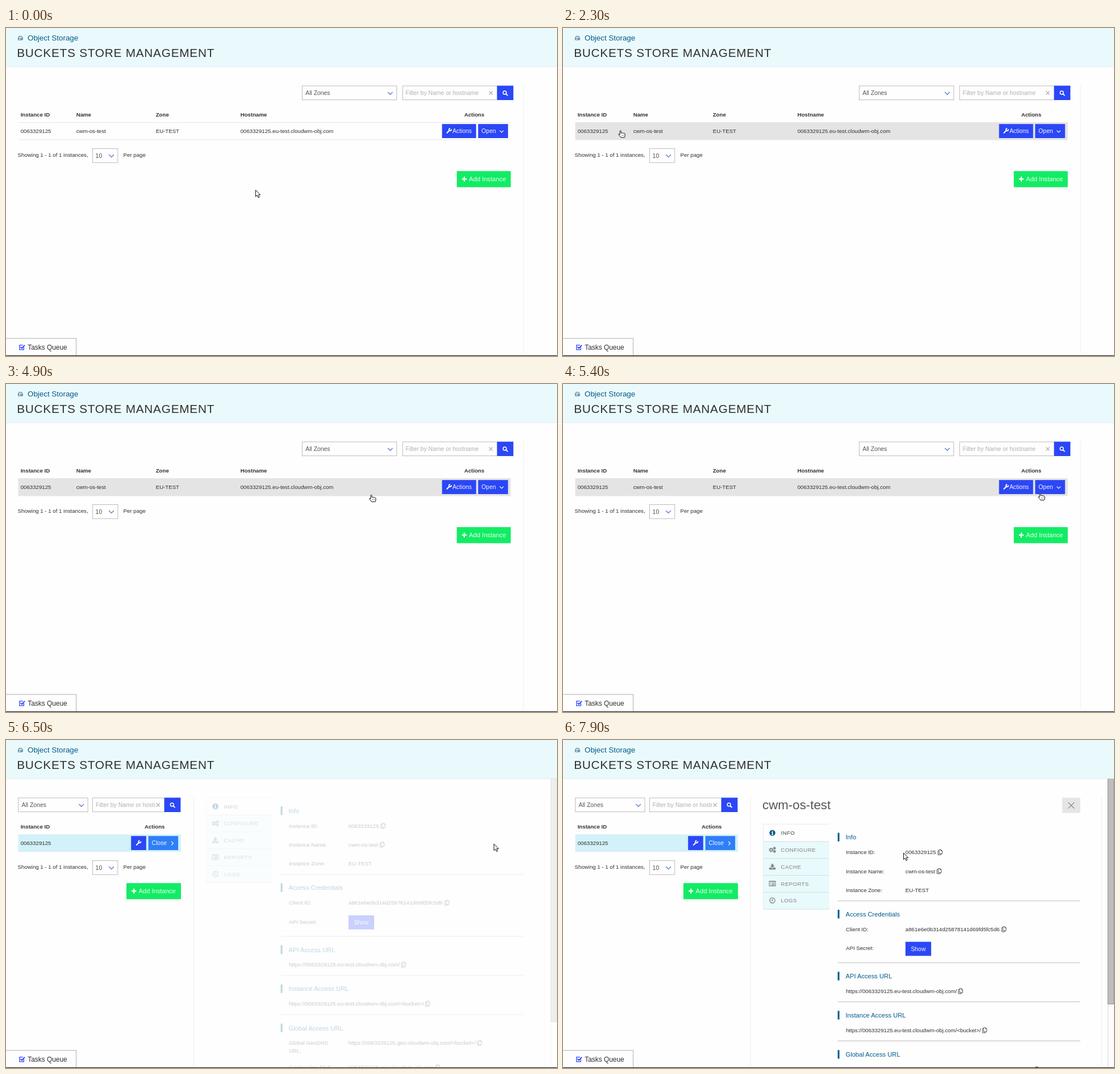
Write an HTML page that moves like this. It is 970x578 px and loops after 8000 ms.

```html
<!DOCTYPE html>
<html lang="en">
<head>
<meta charset="utf-8">
<title>Buckets store management</title>
<style>
html, body { margin: 0; width: 100%; height: 100%; overflow: hidden; background: #fefefe; }
svg { display: block; width: 970px; height: 578px; }
text { font-family: "Liberation Sans", Arial, sans-serif; white-space: pre; }
</style>
</head>
<body>
<svg id="stage" viewBox="0 0 970 578" width="970" height="578"></svg>
<script>
const LOOP = 8000, STEP = 100;
const INK = '#303030', BLUE = '#2b47f6', TEAL = '#005a8c', GREY = '#858585';
const HOST = '0063329125.eu-test.cloudwm-obj.com', ID = '0063329125';
const S = 9.67, M = 10.42, L = 11.16;

const text = (x, y, str, size = S, fill = INK, extra = '') =>
  `<text x="${x}" y="${y}" font-size="${size}" fill="${fill}" ${extra}>${str.replace(/</g, '&lt;')}</text>`;
const rect = (x, y, w, h, fill, extra = '') =>
  `<rect x="${x}" y="${y}" width="${w}" height="${h}" fill="${fill}" ${extra}/>`;
const line = (d, stroke, w = 1, extra = '') =>
  `<path d="${d}" fill="none" stroke="${stroke}" stroke-width="${w}" ${extra}/>`;
const shape = (d, fill, extra = '') => `<path d="${d}" fill="${fill}" ${extra}/>`;
const at = (x, y, body) => `<g transform="translate(${x} ${y})">${body}</g>`;
const bold = 'font-weight="bold"';

const box = (x, y, w, h) => rect(x, y, w, h, '#fefefe', 'stroke="#b4b4b4" stroke-width=".9"');
const chevron = (x, y, r, stroke, w = 1.1) => line(`M${x - r} ${y - r / 2}l${r} ${r}l${r} ${-r}`, stroke, w);
const wrench = (x, y) => at(x, y,
  line('M1.2 8.2L5.4 4', '#fff', 2.1, 'stroke-linecap="round"') +
  line('M8.6 1.7A2 2 0 1 1 6.7 .4', '#fff', 1.9));
const lens = (x, y) => at(x, y,
  '<circle cx="-.8" cy="-.8" r="2.9" fill="none" stroke="#fff" stroke-width="1.5"/>' +
  line('M1.4 1.4L4 4', '#fff', 1.9, 'stroke-linecap="round"'));
const cross = (x, y, r, stroke, w) => line(`M${x - r} ${y - r}l${2 * r} ${2 * r}M${x + r} ${y - r}l${-2 * r} ${2 * r}`, stroke, w);
const copy = (x, y) => at(x, y,
  line('M2.7 .5H6L8.2 2.6V7.7H2.7ZM2.7 2.2H.6V9.6H6V7.7M6 .5V2.6H8.2', '#3a3a3a', .85));

function header() {
  return rect(0, 0, 970, 68, '#eafafc') + rect(0, 67.6, 970, .9, '#e0e9eb') +
    line('M21.6 18L23 14.6H27.8L29.2 18V20.9H21.6ZM21.6 18H29.2M26 19.5H28', '#2f6080', .95) +
    text(38, 21.7, 'Object Storage', 13.38, TEAL) +
    text(19.2, 50.8, 'BUCKETS STORE MANAGEMENT', 20.8, INK, 'letter-spacing=".744"');
}

function filters(zx, zw, fx, fw) {
  const bx = fx + fw, clip = 'clip' + fx;
  return box(zx, 102, zw, 24.6) + text(zx + 5.8, 118.2, 'All Zones', M, '#555') +
    chevron(zx + zw - 11.4, 115, 4.3, '#3d63cc') +
    box(fx, 102, fw, 24.6) +
    `<clipPath id="${clip}">${rect(fx, 100, fw - 16.5, 28, '#000')}</clipPath>` +
    text(fx + 5.4, 118, 'Filter by Name or hostname', M, '#b0b0b0', `clip-path="url(#${clip})"`) +
    cross(bx - 11.3, 114.5, 3.1, '#a8a8a8', 1.3) +
    rect(bx - .3, 101.6, 28.7, 25.4, BLUE) + lens(bx + 14, 114.7);
}

function pager(ax, aw) {
  return text(20.6, 227.2, 'Showing 1 - 1 of 1 instances,') +
    box(152.4, 212.4, 44.4, 24.8) + text(157.6, 228.7, '10', M, '#555') +
    chevron(185.5, 225.4, 4.3, '#3d63cc') + text(206.6, 227.2, 'Per page') +
    rect(ax, 252.2, aw, 28.3, '#12ec64') +
    line(`M${ax + 9} 266.2h8.4M${ax + 13.2} 262v8.4`, '#fff', 2.3) +
    text(ax + 21.5, 270.2, 'Add Instance', L, '#e8ffee');
}

function wideList() {
  const head = [[26, 'Instance ID'], [124, 'Name'], [264, 'Zone'], [413, 'Hostname'], [807, 'Actions']];
  const cells = [[26, ID], [124, 'cwm-os-test'], [264, 'EU-TEST'], [413, HOST]];
  return filters(521.4, 166.4, 698.2, 166.6) + rect(910.6, 101, .9, 472, '#ececec') +
    head.map(([x, s]) => text(x - .3, 156, s, S, INK, bold)).join('') +
    rect(21.5, 166, 867, .9, '#e4e4e4') + rect(21.5, 196.5, 867, .9, '#e4e4e4') +
    '<rect id="row" x="21.5" y="166.4" width="867" height="30.8" fill="#e4e4e4"/>' +
    cells.map(([x, s]) => text(x - .3, 185, s)).join('') +
    rect(767.6, 169.2, 60, 24.8, BLUE) + wrench(775.2, 176.6) + text(785.9, 185.1, 'Actions', M, '#f4f6ff') +
    '<rect id="open" x="831.2" y="169.2" width="52.6" height="24.8"/>' +
    text(837, 185.1, 'Open', M, '#f4f6ff') + chevron(872.6, 182.3, 3.3, '#fff', 1.2) +
    pager(793.6, 95);
}

function slimList() {
  return filters(21.7, 122.4, 152.4, 126.6) + rect(329.9, 101, .9, 476, '#ececec') +
    text(25.7, 156, 'Instance ID', S, INK, bold) + text(244, 156, 'Actions', S, INK, bold) +
    rect(21.5, 166.3, 286.5, 30.8, '#d2f1f9') + text(25.7, 185, ID) +
    rect(220.2, 169.2, 26.6, 24.8, BLUE) + wrench(228.6, 176.8) +
    rect(250.6, 169.2, 52.5, 24.8, '#2f7ff8') + text(256.5, 185.1, 'Close', M, '#f4f8ff') +
    line('M291.3 179l3.1 3.2l-3.1 3.2', '#fff', 1.2) +
    pager(212, 96);
}

const gear = (x, y, r) =>
  `<circle cx="${x}" cy="${y}" r="${r}" fill="none" stroke="${GREY}" stroke-width="1.7"/>` +
  `<circle cx="${x}" cy="${y}" r="${r + 1.2}" fill="none" stroke="${GREY}" stroke-width="1.1" stroke-dasharray="1.3 1.5"/>`;
const tabIcons = [
  `<circle r="5.2" fill="${TEAL}"/>` + line('M0 -3.6V-2M-1.4 -.8H.2V2.8M-1.5 2.9H1.6', '#fff', 1.4),
  gear(-2.3, .2, 2.3) + gear(3.6, -2.7, 1.1) + gear(3.6, 2.9, 1.1),
  shape('M-1.6 -5H1.6V-1.6H4L0 2.2L-4 -1.6H-1.6Z', GREY) + shape('M-5.6 1.6H-2.3L0 3.4L2.3 1.6H5.6V5H-5.6Z', GREY),
  line('M-5.5 -4.3H5.5V4.3H-5.5ZM-5.5 -3.6H5.5M-3.8 -1.2H-2.6M-1.5 -1.2H4M-3.8 .7H-2.6M-1.5 .7H4M-3.8 2.6H-2.6M-1.5 2.6H4', GREY, 1.1),
  `<circle r="4.5" fill="none" stroke="${GREY}" stroke-width="1.4"/>` + line('M.2 -2.7V.6H-2', GREY, 1.1)
];

function tabs() {
  const names = ['INFO', 'CONFIGURE', 'CACHE', 'REPORTS', 'LOGS'];
  return rect(352.4, 101.6, 116.4, 150, '#e9fafc') + rect(352.9, 102, 116, 30, '#fefefe') +
    line('M352.6 251.4V101.7H468.8', '#e3e8e9', .8) +
    names.map((s, i) => {
      const y = 117 + i * 29.8;
      return rect(352.4, 131.9 + i * 29.8, 116.4, .9, '#d0dcde') +
        at(368.6, y, tabIcons[i]) +
        text(383.6, y + 3.6, s, S, i ? '#808080' : '#444', 'letter-spacing=".37"');
    }).join('');
}

const heading = (y, s) => rect(483.6, y - 7.6, 3, 15.2, TEAL) + text(497.5, y + 4.1, s, L, TEAL);
const rule = y => rect(483.6, y - .8, 427.2, 1.6, '#d2d2d2');
const field = (y, label, value) => text(498, y + 3.4, label) + text(602.8, y + 3.4, value);

function info() {
  return heading(124.5, 'Info') +
    field(151.2, 'Instance ID:', ID) + copy(659.4, 146.2) +
    field(184.6, 'Instance Name:', 'cwm-os-test') + copy(657.8, 179.4) +
    field(217.8, 'Instance Zone:', 'EU-TEST') + rule(236.8) +
    heading(260.2, 'Access Credentials') +
    field(287, 'Client ID:', 'a861e6e0b314d25878141d69fd5fc5d6') + copy(771.8, 281.8) +
    text(498, 323.8, 'API Secret:') + rect(602.9, 309, 45.2, 24.8, BLUE) +
    text(612.4, 325, 'Show', M, '#f4f6ff') + rule(345.8) +
    heading(369.4, 'API Access URL') +
    text(498, 399.4, `https://${HOST}/`) + copy(695.4, 390.8) + rule(414.7) +
    heading(438.3, 'Instance Access URL') +
    text(498, 468.3, `https://${HOST}/<bucket>/`) + copy(737.8, 459.8) + rule(483.7) +
    heading(507.4, 'Global Access URL') +
    field(534, 'Global GeoDNS', `https://${ID}.geo.cloudwm-obj.com/<bucket>/`) + copy(829.2, 528.8) +
    text(498, 550.6, 'URL:') +
    field(577, 'Geolocation DNS', `${ID}.geo.cloudwm-obj.com`) + copy(755.6, 571.6);
}

function panel() {
  return '<g id="panel">' + rect(947.6, 101, .9, 476, '#ececec') +
    `<g id="title">${text(351, 122, 'cwm-os-test', 22.3, '#555')}` +
    rect(878.8, 101.7, 31.8, 26.8, '#e4e5e7') + cross(894.7, 115.2, 5.4, '#808080', 1.1) + '</g>' +
    `<g id="detail">${tabs()}${info()}</g>` +
    rect(958.8, 68, 11.2, 510, '#fbfbfb') + rect(958.8, 68, .8, 510, '#cfcfcf') +
    '<rect id="thumb" x="959.2" y="68.2" width="10.6" fill="#bdbdbd" stroke="#8a8a8a" stroke-width=".9"/></g>';
}

function footer() {
  return rect(-1, 547, 124.5, 32, '#fefefe', 'stroke="#b0b0b0"') +
    line('M31.3 562.6V566.8H23.8V558.9H30', BLUE, 1.3) +
    line('M25.6 561.8L28 564.3L33 558.8', BLUE, 1.9) +
    text(38.3, 566.8, 'Tasks Queue', 11.9) + rect(0, 576.9, 970, 1.1, '#1c1c1c');
}

const stroke = 'stroke="#111" stroke-width="1" stroke-linejoin="round"';
const cursor = '<g id="cursor"><g id="arrow">' +
  shape('M.5 .6V12.2L3.2 9.7L5.1 14L7.1 13.1L5.2 9H8.7Z', '#fff', stroke) + '</g><g id="hand">' +
  shape('M-1 7.4V1.4Q-1 .5 0 .5T1 1.4V4.6Q2 4 2.9 4.8Q4 4.2 5 5.1Q6.2 4.6 6.8 5.5Q8 5.3 8 6.7V9Q8 11 7 12.6H.6Q-.5 10.4 -3.2 7.7Q-3.5 6.3 -2.3 6.4Z', '#fff', stroke) +
  line('M2.4 7.8V10M4.2 7.8V10M6 7.8V10', '#555', .6) + '</g></g>';

const $ = id => document.getElementById(id);
$('stage').innerHTML = rect(0, 0, 970, 578, '#fefefe') +
  `<g id="wide">${wideList()}</g><g id="slim">${slimList()}</g>` + panel() + header() + footer() + cursor;

// pointer tip: time, x, y
const path = [
  [0, 439, 285], [700, 439, 285], [800, 425, 277], [900, 370, 248], [1000, 285, 215], [1100, 195, 198],
  [1200, 133, 190], [1400, 80, 188], [1600, 63, 188], [1800, 51, 187.6], [1900, 51, 187.6],
  [2800, 164, 171.3], [3400, 176, 185], [3700, 289, 190.5], [3800, 296, 191.6], [4000, 296, 191.6],
  [4600, 508, 190.5], [4800, 508, 190.5], [4900, 643, 195], [5000, 720, 202], [5200, 790, 202],
  [5400, 840, 192], [5700, 873, 183.5], [5800, 858.5, 182.6], [7000, 858.5, 182.6],
  [7100, 730, 184], [7200, 601.6, 185], [7600, 601.6, 185], [7900, 599, 198.4]
];

function tip(t) {
  const i = path.findIndex(p => p[0] >= t);
  if (i < 0) return path[path.length - 1].slice(1);
  if (i === 0) return path[0].slice(1);
  const [t0, x0, y0] = path[i - 1], [t1, x1, y1] = path[i];
  const k = (t - t0) / (t1 - t0);
  return [x0 + (x1 - x0) * k, y0 + (y1 - y0) * k];
}

const show = (id, on) => $(id).setAttribute('display', on ? 'inline' : 'none');

function draw(ms) {
  const t = Math.floor((ms % LOOP) / STEP) * STEP;
  const [x, y] = tip(t);
  const opened = t >= 6400, titled = t >= 6900;
  const over = !opened && y > 166 && y < 197;
  show('wide', !opened);
  show('slim', opened);
  show('row', over);
  $('open').setAttribute('fill', t >= 6200 ? '#2f4bc6' : BLUE);
  $('panel').setAttribute('opacity', Math.max(0, Math.min(1, (t - 6400) / 400)));
  show('title', titled);
  $('detail').setAttribute('transform', `translate(0 ${titled ? 46.6 : 0})`);
  $('thumb').setAttribute('height', titled ? 397 : 428.4);
  show('hand', over);
  show('arrow', !over);
  $('cursor').setAttribute('transform', `translate(${x} ${y})`);
}

const start = performance.now();
function tick() {
  draw(performance.now() - start);
  requestAnimationFrame(tick);
}
tick();
</script>
</body>
</html>
```
